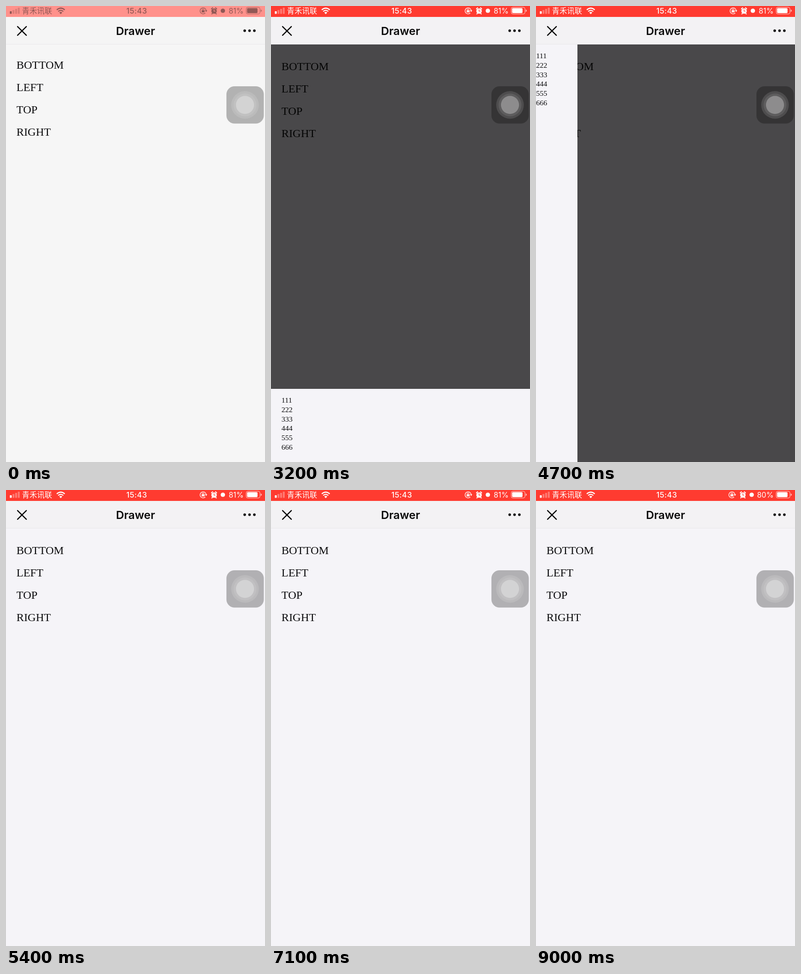
An HTML page that plays this animation: 544x960 px, repeating every 9.1 s.

```html
<!DOCTYPE html>
<html lang="en">
<head>
<meta charset="utf-8">
<title>Drawer</title>
<style>
  html, body { margin: 0; width: 100%; height: 100%; overflow: hidden; background: #f5f4f8; }
  svg { display: block; width: 100%; height: 100%; }
  text { white-space: pre; }
  .list { font: 23.6px "Liberation Serif", "Times New Roman", serif; fill: #0c0c0e; }
  .rows { font: 15.6px "Liberation Serif", "Times New Roman", serif; fill: #0c0c0e; }
  .title { font: 600 23.5px Inter, sans-serif; fill: #0a0a0a; text-anchor: middle; }
  .clock { font: 500 16px Inter, sans-serif; letter-spacing: .4px; text-anchor: middle; }
  .level { font: 400 15.6px Inter, sans-serif; text-anchor: end; }
  .carrier { font: 300 15.8px "Noto Sans CJK SC", "Noto Sans CJK", sans-serif; }
  .ink { fill: currentColor; stroke: none; }
  .line { fill: none; stroke: currentColor; }
</style>
</head>
<body>
<svg viewBox="0 0 544 960">
  <defs>
    <clipPath id="view"><rect y="81" width="544" height="879"/></clipPath>
  </defs>

  <rect id="page" width="544" height="960"/>
  <g clip-path="url(#view)">
    <g id="list" class="list"></g>
    <rect id="shade" y="81" width="544" height="879" fill="#000"/>
    <g id="drawers"></g>
  </g>

  <rect id="header" y="23" width="544" height="58"/>
  <rect id="rule" y="80" width="544" height="1" fill="#e9e8eb"/>
  <path d="M24.3 43.3L42.7 61.7M42.7 43.3L24.3 61.7" stroke="#0a0a0a" stroke-width="2.4" stroke-linecap="round"/>
  <text class="title" x="272" y="61">Drawer</text>
  <g fill="#0a0a0a">
    <circle cx="501.3" cy="52" r="2.7"/><circle cx="511.5" cy="52" r="2.7"/><circle cx="521.7" cy="52" r="2.7"/>
  </g>

  <rect id="status" width="544" height="23"/>
  <g id="icons">
    <g class="ink">
      <rect x="8" y="11" width="4" height="5.5" rx=".8"/>
      <g opacity=".32">
        <rect x="13.6" y="8.5" width="4" height="8" rx=".8"/>
        <rect x="19.2" y="6" width="4" height="10.5" rx=".8"/>
        <rect x="24.8" y="3.5" width="4" height="13" rx=".8"/>
      </g>
      <text class="carrier" x="33.6" y="16">青禾讯联</text>
      <path d="M115 17.2L111.9 13.8Q115 11.2 118.1 13.8Z"/>
      <text class="clock" x="274.6" y="16">15:43</text>
      <text id="level" class="level" x="499" y="16"></text>
    </g>
    <g class="line" stroke-width="2.3">
      <path d="M106.6 8.2Q115 .9 123.4 8.2"/>
      <path d="M109.6 11.5Q115 6.8 120.4 11.5"/>
    </g>
    <g id="badges">
      <path class="line" stroke-width="1.3" d="M418.6 14.7A6.4 6.4 0 1 1 420.4 10"/>
      <path class="ink" d="M417.8 9.2h5l-2.5 3.4z"/>
      <rect class="ink" x="410.9" y="9" width="6.2" height="4.6" rx=".7"/>
      <path class="line" stroke-width="1.1" d="M412.2 9V8a1.8 1.8 0 0 1 3.6 0V9"/>
      <circle class="ink" cx="437" cy="10.6" r="5.7"/>
      <path class="line" stroke-width="1.9" stroke-linecap="round" d="M431.5 6L434 3.6M442.5 6L440 3.6M433.4 15.5L432.4 16.8M440.6 15.5L441.6 16.8"/>
      <path id="hands" fill="none" stroke-width="1.2" d="M437 7V11H440"/>
      <circle class="ink" cx="455.5" cy="10" r="4.6"/>
    </g>
    <rect class="line" x="504.5" y="2.7" width="29" height="14.2" rx="3.6" stroke-width="1" opacity=".75"/>
    <rect class="ink" x="506.3" y="4.5" width="22" height="10.6" rx="2"/>
    <path class="ink" opacity=".75" d="M535.2 7.2q2 .6 2 2.6t-2 2.6z"/>
  </g>

  <rect x="463" y="169" width="78.5" height="78.5" rx="17" fill="#000" opacity=".28"/>
  <g fill="#fff">
    <circle cx="502" cy="208.3" r="29" opacity=".12"/>
    <circle cx="502" cy="208.3" r="24" opacity=".09"/>
    <circle cx="502" cy="208.3" r="19" opacity=".29"/>
  </g>
</svg>
<script>
const LOOP = 9100, STEP = 100;
const OPEN = 400, CLOSE = 220, FADE = 160;
const SHADE = 0.7, LINE = 19.7;

// Rest box of each drawer, and the direction it leaves in.
const drawers = [
  { open: 2780, close: 3480, x: 0,     y: 806, w: 544,   h: 157.7, dx: 0,  dy: 1 },
  { open: 4534, close: 5080, x: 0,     y: 81,  w: 108.8, h: 879,   dx: -1, dy: 0 },
  { open: 6280, close: 6880, x: 0,     y: 81,  w: 544,   h: 157.7, dx: 0,  dy: -1 },
  { open: 8080, close: 8680, x: 435.2, y: 81,  w: 108.8, h: 879,   dx: 1,  dy: 0 }
];

const $ = id => document.getElementById(id);
const clamp = v => Math.min(1, Math.max(0, v));
const easeOut = u => 1 - (1 - u) ** 3;

function add(parent, tag, attrs, text = '') {
  const el = document.createElementNS('http://www.w3.org/2000/svg', tag);
  for (const key in attrs) el.setAttribute(key, attrs[key]);
  el.textContent = text;
  return parent.appendChild(el);
}

function mix(a, b, u) {
  return `rgb(${a.map((v, i) => Math.round(v + (b[i] - v) * u))})`;
}

['BOTTOM', 'LEFT', 'TOP', 'RIGHT'].forEach((word, i) =>
  add($('list'), 'text', { x: 22, y: 134.5 + i * 47.3 }, word));

for (const d of drawers) {
  d.el = add($('drawers'), 'g', { class: 'rows' });
  add(d.el, 'rect', { x: d.x, y: d.y, width: d.w, height: d.h, fill: '#f5f4f8' });
  for (let i = 0; i < 6; i++) {
    add(d.el, 'text', { x: d.x + 22, y: d.y + 29.3 + i * LINE }, String(i + 1).repeat(3));
  }
}

function drawDrawers(t) {
  let shade = 0;
  for (const d of drawers) {
    const closing = clamp((t - d.close) / CLOSE);
    const shown = easeOut(clamp((t - d.open) / OPEN)) * (1 - easeOut(closing));
    const away = 1 - shown;
    d.el.setAttribute('transform', `translate(${d.dx * d.w * away} ${d.dy * d.h * away})`);
    d.el.style.display = shown > 0 ? '' : 'none';
    shade = Math.max(shade, clamp((t - d.open) / FADE) * (1 - closing));
  }
  $('shade').setAttribute('opacity', shade * SHADE);
}

function drawPage(t) {
  const u = clamp(t / 400);
  const bar = mix([255, 145, 139], [255, 59, 48], u);
  $('page').setAttribute('fill', mix([246, 246, 246], [245, 244, 248], u));
  $('header').setAttribute('fill', mix([245, 245, 245], [243, 242, 244], u));
  $('status').setAttribute('fill', bar);
  $('hands').setAttribute('stroke', bar);
  $('icons').style.color = mix([145, 88, 85], [255, 255, 255], u);

  const lift = 3 * (1 - clamp((t - 1000) / 200));
  $('list').setAttribute('transform', `translate(0 ${-lift})`);

  const drained = t >= 8100;
  $('level').textContent = drained ? '80%' : '81%';
  $('badges').setAttribute('transform', `translate(${drained ? -2.5 : 0} 0)`);
}

function frame() {
  const t = Math.floor((performance.now() % LOOP) / STEP) * STEP;
  drawPage(t);
  drawDrawers(t);
  requestAnimationFrame(frame);
}
frame();
</script>
</body>
</html>
```
